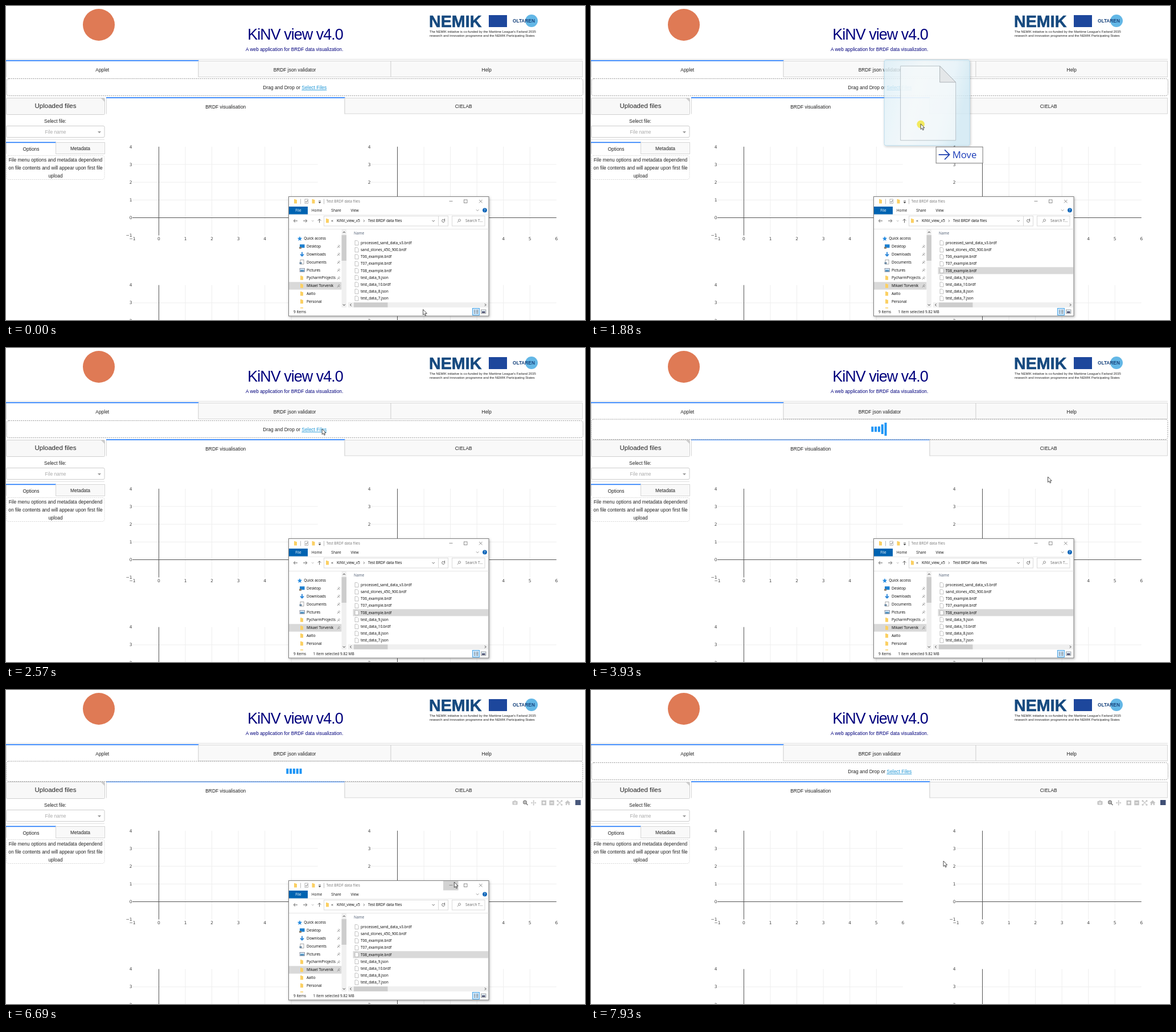
An HTML page that plays this animation: 1017 px wide and 551 px high, repeating every 8000 ms.

```html
<!DOCTYPE html>
<html lang="en">
<head>
<meta charset="utf-8">
<title>KiNV view</title>
<style>
html, body { margin: 0; width: 100%; height: 100%; overflow: hidden; background: #fff; }
svg { display: block; font-family: "Liberation Sans", Arial, sans-serif; white-space: pre; }
.tick { font-family: "DejaVu Sans", Verdana, sans-serif; }
.win { font-family: "Open Sans", "Noto Sans", sans-serif; }
</style>
</head>
<body>
<svg id="stage" width="1017" height="551" viewBox="0 0 1017 551"></svg>
<script>
const BLUE = '#1975fa', LINE = '#d6d6d6', INK = '#222';
const range = n => [...Array(n).keys()];

const text = (x, y, s, size = 8.42, fill = INK, anchor = 'middle', extra = '') =>
  `<text x="${x}" y="${y}" font-size="${size}" fill="${fill}" text-anchor="${anchor}" ${extra}>${s}</text>`;
const rect = (x, y, w, h, fill = 'none', stroke = 'none', extra = '') =>
  `<rect x="${x}" y="${y}" width="${w}" height="${h}" fill="${fill}" stroke="${stroke}" ${extra}/>`;
const path = (d, stroke = '#444', width = 1, fill = 'none') =>
  `<path d="${d}" stroke="${stroke}" stroke-width="${width}" fill="${fill}"/>`;
const circle = (x, y, r, fill, extra = '') => `<circle cx="${x}" cy="${y}" r="${r}" fill="${fill}" ${extra}/>`;
const group = (id, body, extra = '') => `<g id="${id}" ${extra}>${body}</g>`;

// ---- page ----
function tab(x, y, w, h, label, active, base) {
  const box = active
    ? path(`M${x + .5} ${y}V${y + h}M${x + w - .5} ${y}V${y + h}`, LINE) + rect(x, y - .9, w, 1.6, BLUE)
    : rect(x + .5, y + .5, w - 1, h - 1, '#f9f9f9', LINE);
  return box + text(x + w / 2, base, label);
}

function header() {
  return circle(163, 33, 28, '#df7a55')
    + text(424.3, 58.5, 'KiNV view v4.0', 27, '#00007d', 'start', 'letter-spacing="-1"')
    + text(506.7, 78.5, 'A web application for BRDF data visualization.', 8.4, '#00007d')
    + text(743, 37, 'NEMIK', 28.7, '#15497f', 'start', 'font-weight="bold" stroke="#15497f" stroke-width=".6"')
    + rect(848, 16, 32, 21, '#1d479c')
    + circle(923, 26, 11, '#63b7e6')
    + text(890, 28.8, 'OLTAREN', 8.3, '#17437d', 'start', 'font-weight="bold"')
    + text(744, 46.5, "The NEMIK initiative is co-funded by the Maritime League's Farland 2035", 5.78, '#222', 'start')
    + text(744, 53.5, 'research and innovation programme and the NEMIK Participating States', 5.78, '#222', 'start')
    + path('M0 93.5H1013', '#ddd');
}

function sidebar() {
  return rect(.5, 161.5, 173, 29, '#f8f8f8', '#d0d0d0', 'rx="2"')
    + path('M166 161H173V168Z', 'none', 0, '#ccc')
    + text(87, 179.3, 'Uploaded files', 11.5)
    + text(86.5, 205, 'Select file:')
    + rect(.5, 210.5, 172.5, 20, '#fff', '#ccc', 'rx="2"')
    + text(87, 223.5, 'File name', 8.42, '#aaa')
    + path('M161 220H167L164 223.3Z', 'none', 0, '#999')
    + path('M0 234.5H173', '#e2e2e2')
    + tab(0, 239.5, 88, 20, 'Options', true, 254)
    + tab(87, 239, 87, 21, 'Metadata', false, 253)
    + rect(.5, 262.5, 172.5, 42, 'none', LINE, 'rx="4" stroke-dasharray="2 1.5"')
    + ['File menu options and metadata dependend', 'on file contents and will appear upon first file', 'upload']
      .map((s, i) => text(87, 272.5 + 14 * i, s)).join('');
}

function plot(x, y) {
  const dx = 46.55, dy = 31.15, X = i => x + dx * i, Y = i => y - dy * i;
  const left = X(-1), right = X(6), top = Y(4), bottom = Y(-1);
  const num = n => n < 0 ? '−1' : n;
  let grid = '', ticks = '';
  for (let i = 1; i < 6; i++) grid += `M${X(i)} ${top}V${bottom}`;
  for (let i = 1; i < 4; i++) grid += `M${left} ${Y(i)}H${right}`;
  for (let i = -1; i < 7; i++) ticks += text(X(i), bottom + 8, num(i), 7.5, '#444');
  for (let i = -1; i < 5; i++) ticks += text(left - .3, Y(i) + 2.6, num(i), 7.5, '#444', 'end');
  return path(grid, '#eee') + path(`M${x} ${top}V${bottom}M${left} ${y}H${right}`, '#555') + `<g class="tick">${ticks}</g>`;
}

function modebar() {
  const c = '#c4c4c4';
  return rect(889.5, 195, 9, 6.5, c, 'none', 'rx="1"') + rect(892, 194, 4, 2, c) + circle(894, 198.2, 2, '#fff') + circle(894, 198.2, 1.1, c)
    + circle(911.5, 197, 2.8, 'none', 'stroke="#777" stroke-width="1.4"') + path('M913.5 199L916.5 202', '#777', 1.6) + path('M910 197H913M911.5 195.5V198.5', '#777', .8)
    + path('M922.5 198H931M926.7 193.7V202.3', c, 1.2)
    + path('M922 198L924 196.3V199.7ZM931.4 198L929.4 196.3V199.7ZM926.7 193.3L925 195.3H928.4ZM926.7 202.7L925 200.7H928.4Z', 'none', 0, c)
    + rect(940.5, 193.7, 8.5, 8.5, c) + path('M942.5 198H947M944.7 195.7V200.2', '#fff', 1.3)
    + rect(954.3, 193.7, 8.5, 8.5, c) + path('M956.3 198H960.8', '#fff', 1.3)
    + path('M968.5 194L976.5 202M976.5 194L968.5 202M968.2 196V193.7H970.5M974.5 193.7H976.8V196M968.2 200V202.3H970.5M974.5 202.3H976.8V200', c, 1.1)
    + path('M986.5 193.5L991.5 198H990V202H987.6V199.3H985.4V202H983V198H981.5Z', 'none', 0, c)
    + rect(1000, 193, 9.5, 9, '#3f4f75');
}

const dashed = 'rx="4" stroke-dasharray="2 1.5"';
const dropZone = rect(1, 127.5, 1012.5, 30, '#fff', '#999', dashed)
  + text(451.3, 146, 'Drag and Drop or <tspan fill="#1e96d6" text-decoration="underline">Select Files</tspan>', 8.5, INK, 'start');
const loader = rect(.5, 125, 1012.5, 35.5, '#fff', '#999', dashed)
  + range(5).map(i => rect(492.3 + 5.8 * i, 131, 4, 23, '#1d95f6', 'none', 'class="bar"')).join('');

// ---- file window ----
const files = ['processed_sand_data_v3.brdf', 'sand_stones_450_900.brdf', 'T06_example.brdf', 'T07_example.brdf',
  'T08_example.brdf', 'test_data_9.json', 'test_data_10.brdf', 'test_data_8.json', 'test_data_7.json'];
const places = ['Quick access', 'Desktop', 'Downloads', 'Documents', 'Pictures', 'PycharmProjects', 'Mikael Torvenik', 'Aalto', 'Personal'];
const ROW0 = 409.6, ROW = 12.17, PICKED = 4;

const label = (x, y, s, fill = '#000', anchor = 'start', size = 6.5) => text(x, y, s, size, fill, anchor);
const folder = (x, y) => path(`M${x} ${y}h2.2l.8 1h2v6.5h-5z`, 'none', 0, '#fbd063');

function placeIcon(i, y) {
  if (i === 0) return path(`M516 ${y - 4}l1.2 2.7 2.9.3-2.2 2 .7 2.9-2.6-1.5-2.6 1.5.7-2.9-2.2-2 2.9-.3z`, 'none', 0, '#2a8de0');
  if (i === 1) return rect(516, y - 3.5, 8.5, 6, '#1b7fd0') + rect(515, y + 1, 4, 3, '#8a7a66');
  if (i === 2) return path(`M520 ${y - 4}V${y + 3}M517 ${y}L520 ${y + 3}L523 ${y}`, '#2583d8', 1.8);
  if (i === 3) return rect(517, y - 4, 6, 7.5, '#fff', '#888', 'stroke-width=".7"') + rect(515.5, y, 4, 3.5, '#6f8ba5');
  if (i === 4) return rect(516, y - 3, 8.5, 6, '#cfe6f7', '#778', 'stroke-width=".7"') + rect(517, y, 6.5, 2.5, '#4588b8');
  return folder(517, y - 3.8);
}

function fileWindow() {
  let s = rect(496.5, 334.5, 351.5, 209.5, '#fff', '#7f7f7f', 'filter="url(#shadow)"');
  // title bar
  s += rect(768, 335, 26.5, 16.5, '#d2d2d2', 'none', 'id="minHover"')
    + folder(506, 339) + path('M517.5 338.5V347.5M558.5 338.5V347.5', '#aaa', .8)
    + rect(525, 339, 5.5, 7.5, '#fff', '#999', 'stroke-width=".7"') + path('M526 343l1.4 1.5 2.4-3.4', '#555', .8)
    + folder(537.5, 339) + path('M549 342h4M549.3 344.2h3.4l-1.7 1.8z', '#333', .7, '#333')
    + label(562.5, 345.3, 'Test BRDF data files', '#777')
    + path('M778.5 342.5H784.5M831 340l5.5 5.5M836.5 340l-5.5 5.5', '#777', .8) + rect(804.5, 340, 5.5, 5.5, 'none', '#777', 'stroke-width=".8"');
  // ribbon and address row
  s += rect(497, 352, 33, 13.5, '#0063b1') + label(513.5, 361, 'File', '#fff', 'middle')
    + label(546, 361, 'Home', '#111', 'middle') + label(580, 361, 'Share', '#111', 'middle') + label(612.5, 361, 'View', '#111', 'middle')
    + path('M826 357.3l2.2 2.2 2.2-2.2', '#777', .8)
    + circle(841, 358.3, 3.9, '#0a64b8') + label(841, 360.7, '?', '#fff', 'middle')
    + path('M497 366.5H847.5', '#eaeaea')
    + path('M512 377H505.5M508 374.3L505.2 377L508 379.7M522 377H528.5M526 374.3L528.8 377L526 379.7M550.5 380.5V374M547.8 376.7L550.5 373.8L553.2 376.7', '#555', .9)
    + path('M537 376.3l1.7 1.7 1.7-1.7', '#999', .8)
    + rect(558.5, 368.5, 218, 17.5, '#fff', '#d9d9d9') + path('M759.5 368.5V386', '#d9d9d9') + folder(562, 373)
    + label(571, 379, '«', '#333', 'start', 8) + label(581, 379.3, 'KiNV_view_v5') + path('M627.8 375l1.9 2-1.9 2', '#555', .8) + label(636, 379.3, 'Test BRDF data files')
    + path('M748.5 376l2.2 2.2 2.2-2.2', '#555', .9) + path('M770 375.2a2.5 2.5 0 1 1-2-.8M770.5 373.2v2.2h-2.2', '#555', .9)
    + rect(783.5, 368.5, 57.5, 17.5, '#fff', '#d9d9d9') + circle(796.5, 376, 2, 'none', 'stroke="#777" stroke-width=".8"')
    + path('M795 377.6l-2.3 2.4', '#777', .8) + label(807, 379.3, 'Search T...', '#666')
    + path('M497 391.5H847.5', '#e5e5e5');
  // navigation pane
  s += rect(497, 484.3, 92.5, 13.4, '#d9d9d9');
  places.forEach((p, i) => {
    const y = 408 + 13.83 * i;
    s += placeIcon(i, y) + label(i ? 528 : 523.3, y + 2.3, p);
    if (i > 0 && i < 7) s += path(`M582 ${y + 2.5}l2-2M583 ${y - 1}l3 3M584.5 ${y - 2.5}l2 2`, '#777', 1);
  });
  s += rect(517, 529, 5, 1.5, '#fbd063')
    + rect(589.5, 392, 8.5, 137, '#f0f0f0') + rect(589.5, 402, 8.5, 45, '#cdcdcd')
    + path('M591.8 398l2-2 2 2M591.8 523.5l2 2 2-2', '#333', 1);
  // file list
  s += label(611, 401.3, 'Name', '#4c5a70')
    + rect(609.5, 0, 237.5, ROW, '#e5f3ff', 'none', 'id="hover"')
    + rect(609.5, ROW0 + ROW * PICKED, 237.5, ROW, '#cce8ff', 'none', 'id="picked"');
  files.forEach((f, i) => {
    const y = ROW0 + ROW * (i + .5);
    s += path(`M613 ${y - 4}h4l2 2v6h-6z`, '#a5a5a5', .7, '#fff') + label(623, y + 2.3, f);
  });
  s += rect(601, 520, 246, 9, '#f0f0f0') + rect(611, 520.3, 59.5, 8.4, '#cdcdcd')
    + path('M606.5 522.5l-2 2 2 2M841 522.5l2 2-2 2', '#333', 1);
  // status bar
  s += label(505, 538.8, '9 items', '#111') + group('status', label(539.5, 538.8, '1 item selected  9.82 MB', '#111'))
    + rect(819.5, 530.5, 12, 12, '#cce8ff', '#3a9be0', 'stroke-width=".9"')
    + path('M822 534h2.5M822 536.5h2.5M822 539h2.5M826 534h3.5M826 536.5h3.5M826 539h3.5', '#555', .9)
    + rect(834.5, 533, 8.5, 6.5, '#dce8f0', '#888', 'stroke-width=".7"') + rect(836, 536, 5.5, 2.5, '#446');
  return s;
}

// drawn relative to the pointer tip
const dragImage = rect(-64, -112, 150, 150, 'url(#glass)', '#a9d3e8', 'rx="3" filter="url(#shadow)" opacity=".8"')
  + path('M-35.5 -101.5H33.5L61.5 -73V29H-35.5Z', '#b4bfc5', .9, 'rgba(246,249,251,.7)')
  + path('M33.5 -101.5V-73H61.5Z', '#a5adb2', .9, '#e4e7e9');
const dragLabel = rect(27, 40.5, 82, 28.5, '#fff', '#767676')
  + path('M31.5 54H50M42 45.5L50.5 54L42 62.5', '#1c3fae', 1.7)
  + text(55.5, 60.5, 'Move', 16.8, '#1b3cb8', 'start', 'class="win"');

stage.innerHTML = `<defs>
  <filter id="shadow" x="-10%" y="-10%" width="120%" height="120%"><feDropShadow dx="1" dy="1.5" stdDeviation="2" flood-opacity=".3"/></filter>
  <linearGradient id="glass" x2="1" y2=".25"><stop stop-color="#dceff7"/><stop offset=".45" stop-color="#f0f7fa"/><stop offset=".8" stop-color="#e6f3f9"/><stop offset="1" stop-color="#cfe8f3"/></linearGradient>
  </defs>`
  + header()
  + tab(0, 96, 338.5, 29, 'Applet', true, 115) + tab(337.5, 96, 339, 29, 'BRDF json validator', false, 114.5) + tab(675.5, 96, 337.5, 29, 'Help', false, 114.5)
  + sidebar()
  + tab(176, 161, 419.5, 28.5, 'BRDF visualisation', true, 179.8) + tab(594.5, 161, 418.5, 28.5, 'CIELAB', false, 179)
  + [268.5, 687.5].map(x => plot(x, 371.5) + plot(x, 614.3)).join('')
  + group('modes', modebar()) + group('zone', dropZone) + group('load', loader)
  + group('win', fileWindow(), 'class="win"')
  + group('drag', dragImage) + group('tag', dragLabel)
  + group('pointer', circle(0, .8, 6.8, '#f2e52b', 'id="press" opacity=".75"')
    + path('M0 0V9.6L2.2 7.6L3.7 11L5.3 10.3L3.8 7H6.8Z', '#222', .8, '#fff'));

// ---- motion ----
const el = id => document.getElementById(id);
const bars = [...document.querySelectorAll('.bar')];
const clamp = v => Math.min(1, Math.max(0, v));
const ramp = (t, a, b) => clamp((t - a) / (b - a));
const ease = p => (1 - Math.cos(Math.PI * p)) / 2;
const show = (id, on) => el(id).setAttribute('display', on ? 'inline' : 'none');
const set = (id, name, value) => el(id).setAttribute(name, value);

// time, x, y of the pointer tip
const route = [[260, 732.5, 532.5], [850, 675.5, 467.5], [1500, 675.5, 467.5], [2040, 555.2, 142], [3260, 555.2, 142],
  [3600, 692, 288], [3930, 802.5, 226], [4250, 838.5, 241.5], [5790, 838.5, 241.5], [6570, 790, 330],
  [6690, 787.3, 337], [6870, 786, 341], [7150, 786, 341], [7890, 619, 300]];

function pointerAt(t) {
  const i = route.findIndex(k => k[0] > t);
  if (i < 0) return route.at(-1).slice(1);
  if (i === 0) return route[0].slice(1);
  const a = route[i - 1], b = route[i], p = ease(ramp(t, a[0], b[0]));
  return [a[1] + (b[1] - a[1]) * p, a[2] + (b[2] - a[2]) * p];
}

// spinner bar: up during the first fifth of a cycle, down during the second
function stretch(phase) {
  const p = (phase + 1) % 1;
  return .4 + .6 * (p < .2 ? ease(p / .2) : p < .4 ? ease((.4 - p) / .2) : 0);
}

function draw(t) {
  const [x, y] = pointerAt(t), at = `translate(${x} ${y})`;
  const clicked = t >= 1470, loading = t >= 3250 && t < 7910;

  set('pointer', 'transform', at);
  show('press', clicked && t < 2200);

  const row = Math.floor((y - ROW0) / ROW);
  show('hover', !clicked && x > 609 && row < files.length);
  set('hover', 'y', ROW0 + ROW * row);
  show('picked', clicked);
  set('picked', 'fill', y > 334 && t < 2200 ? '#cce8ff' : '#d9d9d9');
  show('status', clicked);

  set('drag', 'transform', at);
  set('drag', 'opacity', t < 1570 ? 0 : 1 - ramp(t, 2280, 2570));
  set('tag', 'transform', at);
  show('tag', t > 1570 && t < 2200 && y < 334);

  show('zone', !loading);
  show('load', loading);
  bars.forEach((bar, i) => {
    const h = 23 * stretch(Math.max(0, t - 3250) / 1256 - i / 12);
    bar.setAttribute('y', 142.5 - h / 2);
    bar.setAttribute('height', h);
  });

  set('modes', 'opacity', ramp(t, 4060, 4270) - ramp(t, 6680, 6880) + ramp(t, 7130, 7330));

  // the window shrinks towards the task bar
  const m = ramp(t, 7080, 7330), q = m * m, k = 1 - .6 * q;
  show('win', m < 1);
  show('minHover', t > 6640);
  set('win', 'opacity', 1 - m);
  set('win', 'transform', `translate(${672 - 230 * q} ${439 + 130 * q}) scale(${k}) translate(-672 -439)`);
}

function tick() {
  draw(performance.now() % 8000);
  requestAnimationFrame(tick);
}
tick();
</script>
</body>
</html>
```
